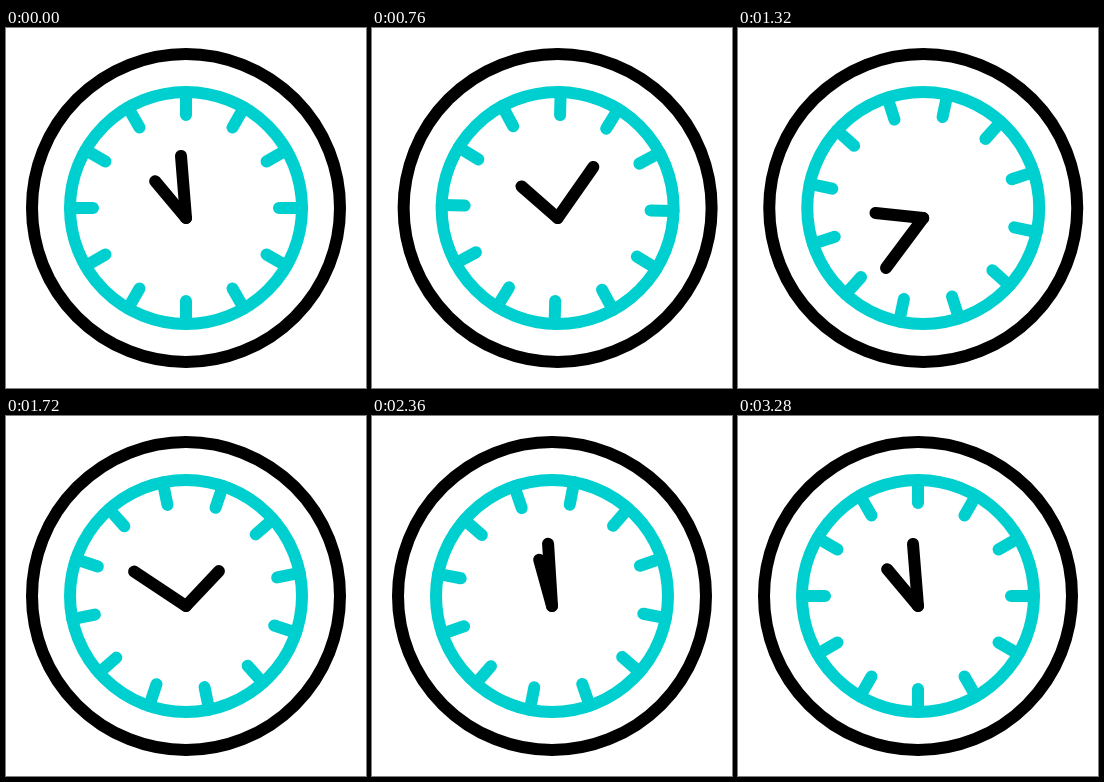
Animation, 360 px wide and 360 px high, one loop 3.64 s. Source, as an HTML page:

```html
<!DOCTYPE html>
<html lang="en">
<head>
<meta charset="utf-8">
<title>Clock</title>
<style>
  html, body { margin: 0; width: 100%; height: 100%; overflow: hidden; background: #fff; }
  svg { display: block; width: 100%; height: 100%; }
  svg * { fill: none; stroke-width: 12; stroke-linecap: round; }
  .dark { stroke: #000; }
  .teal { stroke: #00cfcf; }
</style>
</head>
<body>
<svg viewBox="0 0 360 360">
  <g id="clock">
    <circle class="dark" cx="180" cy="180" r="154"/>
    <circle class="teal" cx="180" cy="180" r="116"/>
    <path id="ticks" class="teal"/>
    <path id="hour" class="dark" d="M180 190V142"/>
    <path id="minute" class="dark" d="M180 190V127.7"/>
  </g>
</svg>
<script>
const LOOP = 3640, STEP = 40;

// Keys are [ms, value]; the curve eases to a stop at every turning point.
const tracks = {
  shift: [[0, 0], [350, -11], [640, 11], [960, -6], [1240, 6], [1600, 0]],
  ticks: [[0, 0], [280, -12.5], [760, 1.5], [1320, 12], [1720, 18.5], [2360, 11], [2680, 0]],
  hour: [[0, -40], [280, -60], [760, -48.8], [1320, 276], [1720, 403.3], [2360, 344.5], [2680, 320]],
  minute: [[0, -4.6], [280, -23.7], [760, 35], [1320, 216.7], [1720, 303.5], [2360, 356.4], [2680, 355.4]]
};

const chord = (keys, i) => (keys[i + 1][1] - keys[i][1]) / (keys[i + 1][0] - keys[i][0]);

function slope(keys, i) {
  if (i === 0 || i === keys.length - 1) return 0;
  const a = chord(keys, i - 1), b = chord(keys, i);
  return a * b <= 0 ? 0 : 2 * a * b / (a + b);
}

function valueAt(keys, t) {
  const i = keys.findIndex((key, n) => n + 1 < keys.length && t < keys[n + 1][0]);
  if (i < 0) return keys[keys.length - 1][1];
  const [t0, v0] = keys[i], [t1, v1] = keys[i + 1];
  const span = t1 - t0, u = (t - t0) / span, w = 1 - u;
  return v0 * w * w * (1 + 2 * u) + v1 * u * u * (3 - 2 * u)
    + span * u * w * (slope(keys, i) * w - slope(keys, i + 1) * u);
}

const part = id => document.getElementById(id);
const clock = part("clock"), ticks = part("ticks"), hour = part("hour"), minute = part("minute");

const point = (r, a) => `${180 + r * Math.sin(a)} ${180 - r * Math.cos(a)}`;
ticks.setAttribute("d", Array.from({ length: 12 }, (_, i) => {
  const a = i * Math.PI / 6;
  return `M${point(116, a)}L${point(93, a)}`;
}).join(""));

const rotate = (el, angle, cy) => el.setAttribute("transform", `rotate(${angle} 180 ${cy})`);

function draw(t) {
  clock.setAttribute("transform", `translate(${valueAt(tracks.shift, t)} 0)`);
  rotate(ticks, valueAt(tracks.ticks, t), 180);
  rotate(hour, valueAt(tracks.hour, t), 190);
  rotate(minute, valueAt(tracks.minute, t), 190);
}

let start;
function frame(now) {
  start ??= now;
  const t = (now - start) % LOOP;
  draw(Math.floor(t / STEP) * STEP);
  requestAnimationFrame(frame);
}
draw(0);
requestAnimationFrame(frame);
</script>
</body>
</html>
```
